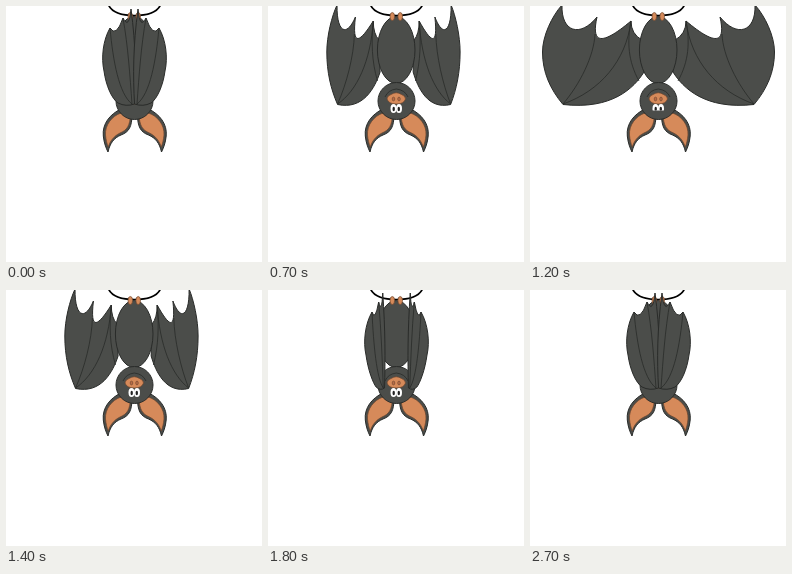
Recreate the animation shown at these times as an HTML page. Size 256 by 256 pixels, loop 3300 ms.

```html
<!DOCTYPE html>
<html lang="en">
<head>
<meta charset="utf-8">
<title>Bat</title>
<style>
html, body { margin: 0; width: 100%; height: 100%; overflow: hidden; background: #fff; }
svg { display: block; width: 100vw; height: 100vh; }
.fur { fill: #4b4d4a; stroke: #292b29; stroke-width: 1; }
.bone { fill: none; stroke: #292b29; stroke-width: .8; }
.skin { fill: #d68a5a; stroke: #6b452f; stroke-width: .7; }
path { vector-effect: non-scaling-stroke; stroke-linejoin: round; }
</style>
</head>
<body>
<svg viewBox="0 0 256 256">
  <defs>
    <g id="spread">
      <path class="fur" d="M114 66 C104 82 82 104 33 98.500 C20 83 12.500 66 12.500 46 C12.500 30 22 10 32 -1 C31 26 50 32 67 11 C60 42 76 36 101 15 Q101 28 112 34Z"/>
      <path class="bone" d="M33 98 C50 78 64 50 65 28 M33 98 C70 85 96 55 101 15 C97 36 98 55 109 75"/>
    </g>
    <g id="fold">
      <path id="foldSkin" class="fur"/>
      <path id="foldBones" class="bone"/>
    </g>
    <g id="ear">
      <path class="fur" d="M115 103 C104 108 96 118 97.300 130 C98 137 100 142 102 146 C104 137 108 132 115 129 C123 126 126 121 126 108Z"/>
      <path class="skin" d="M115 107 C106 110 98.800 119 99.500 129 C100 134 101 138 102.300 141 C104 135 108 130 114 127 C121 124 124 120 124.500 108Z"/>
    </g>
    <clipPath id="lid"><rect id="lidBox" x="118" y="97" width="22" height="11"/></clipPath>
  </defs>
  <rect width="256" height="256" fill="#fff"/>
  <path d="M102.500 -1 C106 6.500 116 9.500 128.500 9.500 C141 9.500 151 6.500 154.500 -1" fill="none" stroke="#000" stroke-width="1.700"/>
  <g id="back">
    <g id="wingL"><use href="#spread"/></g>
    <g transform="translate(257) scale(-1 1)"><g id="wingR"><use href="#spread"/></g></g>
  </g>
  <use href="#ear"/>
  <g id="earR"><use href="#ear" transform="translate(257.500) scale(-1 1)"/></g>
  <ellipse class="fur" cx="128.200" cy="44" rx="18.800" ry="33.500"/>
  <ellipse class="skin" cx="124.300" cy="10.500" rx="2.300" ry="4"/>
  <ellipse class="skin" cx="132.200" cy="10.500" rx="2.300" ry="4"/>
  <circle class="fur" cx="128.500" cy="95" r="18.500"/>
  <path class="bone" d="M117 91 Q120 84 128.300 83 Q137 84 140 91"/>
  <path class="skin" d="M119 93 Q119 90 123 88.500 Q128.300 85 133.500 88.500 Q137.500 90 137.500 93 Q136 98 128.300 98 Q120.500 98 119 93Z"/>
  <g fill="#b96b45" stroke="#6b452f" stroke-width=".6">
    <ellipse cx="125.500" cy="93" rx="1.300" ry="1.900"/>
    <ellipse cx="131" cy="93" rx="1.300" ry="1.900"/>
  </g>
  <g clip-path="url(#lid)">
    <g fill="#fff">
      <ellipse cx="125.500" cy="102.500" rx="3" ry="4.500"/>
      <ellipse cx="131" cy="102.500" rx="3" ry="4.500"/>
    </g>
    <g fill="#222">
      <ellipse cx="125.700" cy="103" rx="1.200" ry="2.200"/>
      <ellipse cx="130.800" cy="103" rx="1.200" ry="2.200"/>
    </g>
  </g>
  <g id="front">
    <use href="#fold"/>
    <use href="#fold" transform="translate(257) scale(-1 1)"/>
  </g>
</svg>
<script>
const STEP = 100, LOOP = 3300, LAST = 27;
const $ = id => document.getElementById(id);

// Key lists hold [step, value] pairs; steps are 100 ms.
const FOLD = [[0, 1], [1, 1], [4, .35], [17, .35], [21, 1]];
const SPREAD = [[5, .235], [6, .337], [7, .525], [8, .8], [9, 1], [12, 1], [13, .8], [14, .525], [15, .337], [16, .235]];
const EYES = [[0, 0], [2, 1], [9, 1], [11, .35], [13, 1], [21, 1], [22, .65], [23, 0]];
const EAR = [[23, 0], [24, 4], [25, -2], [26, 4], [27, 0]];

function at(keys, n) {
  if (n <= keys[0][0]) return keys[0][1];
  for (let i = 1; i < keys.length; i++) {
    const [a, v] = keys[i - 1], [b, w] = keys[i];
    if (n <= b) return v + (w - v) * (n - a) / (b - a);
  }
  return keys[keys.length - 1][1];
}

// The outer rim stays put while the inner membrane gathers towards it.
function foldWing(s) {
  const p = (x, y) => (x > 104 ? 104 + (x - 104) * s : x).toFixed(2) + ' ' + y + ' ';
  const top = p(104, 22), mid = p(117, 12), tip = p(125, 3), wrist = p(126, 98);
  $('foldSkin').setAttribute('d', 'M' + top + 'C' + p(97, 34) + p(95, 52) + p(98, 65) +
    'C' + p(100, 80) + p(106, 93) + p(112, 97) + 'Q' + p(120, 101) + p(128.5, 98) +
    'C' + p(130, 70) + p(130, 40) + tip + 'Q' + p(123, 24) + mid + 'Q' + p(110, 32) + top + 'Z');
  $('foldBones').setAttribute('d', 'M' + wrist + 'C' + p(124, 70) + p(122, 40) + mid +
    'M' + wrist + 'C' + p(113, 88) + p(107, 55) + top);
}

function spreadWing(id, s) {
  $(id).setAttribute('transform', `translate(${110 * (1 - s)}) scale(${s} 1)`);
}

function draw(ms) {
  const n = Math.min(LAST, Math.floor(ms % LOOP / STEP));
  const open = n >= 5 && n <= 16;
  $('back').style.display = open ? '' : 'none';
  $('front').style.display = open ? 'none' : '';
  if (open) {
    const s = at(SPREAD, n);
    spreadWing('wingL', s);
    spreadWing('wingR', s - s * (1 - s) / 4); // the right wing lags a little
  } else foldWing(at(FOLD, n));
  $('lidBox').setAttribute('height', 11 * at(EYES, n));
  $('earR').setAttribute('transform', `rotate(${at(EAR, n)} 137 110)`);
}

const start = performance.now();
function tick() {
  draw(performance.now() - start);
  requestAnimationFrame(tick);
}
tick();
</script>
</body>
</html>
```
